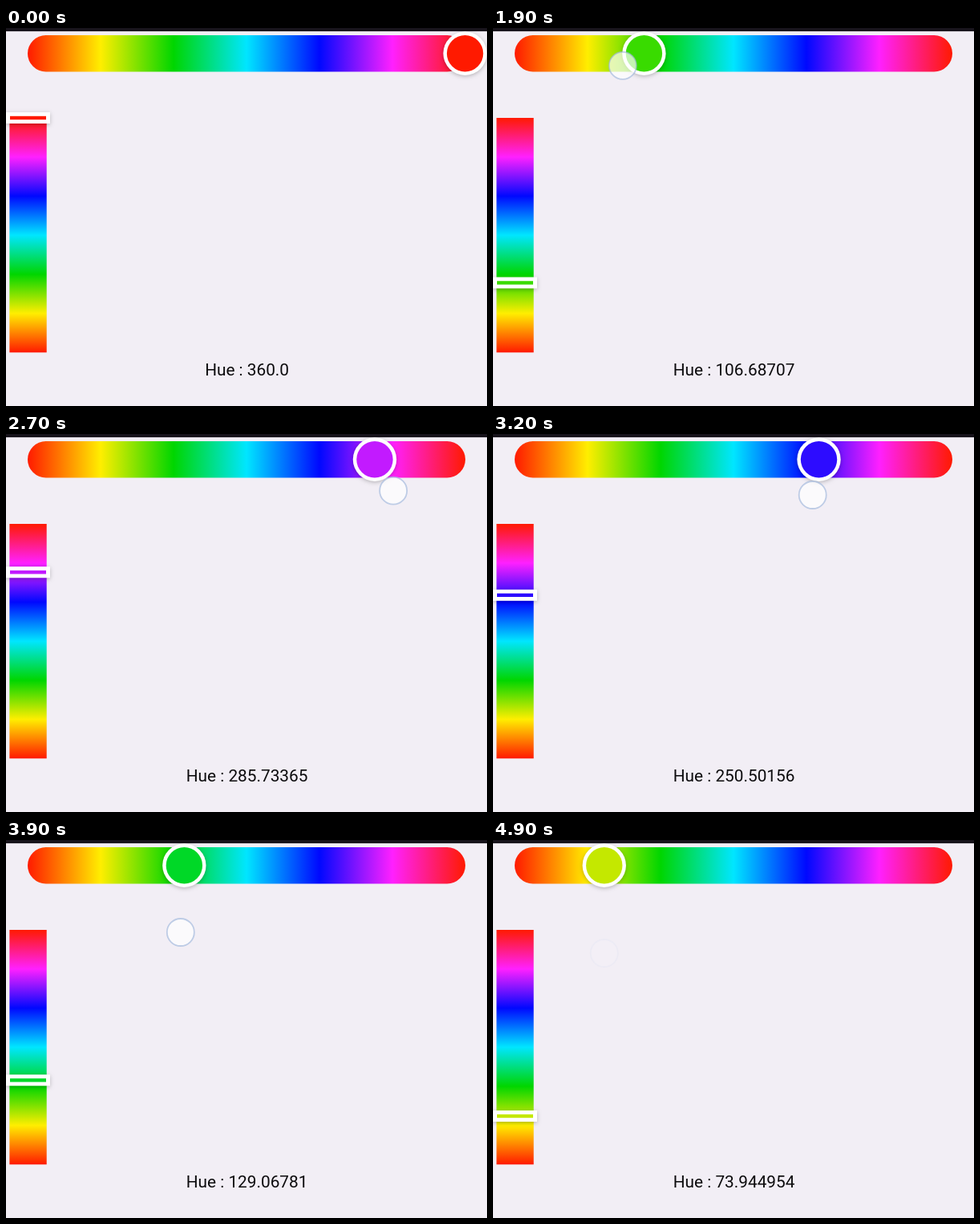
These frames come from a looping animation (600x471 px, 5000 ms). An HTML page with a canvas:

```html
<!DOCTYPE html>
<html lang="en">
<head>
<meta charset="utf-8">
<title>Hue sliders</title>
<style>
  html, body { margin: 0; width: 100%; height: 100%; overflow: hidden; background: #f2eef5; }
  canvas { position: absolute; left: 0; top: 0; display: block; }
  #label {
    position: absolute; left: 0.6px; top: 414px; width: 600px;
    font: 20.8px/24px Roboto, Arial, sans-serif;
    color: #0c0b0d; text-align: center; white-space: pre;
  }
</style>
</head>
<body>
<canvas id="stage" width="600" height="471"></canvas>
<div id="label"></div>
<script>
const ctx = document.getElementById('stage').getContext('2d');
const label = document.getElementById('label');

const LOOP = 5000, STEP = 100, TOUCH_START = 1500, LAG = 25;
const STOPS = ['#ff1a00', '#ffee00', '#00d600', '#00e6ff', '#0008ff', '#ff20ff', '#ff1a00'];

// Turning points of the drag: time, hue, finger height
const POSES = [
  [1500, 356.03772, 25], [2150, 0, 62], [2300, 14.956584, 67], [2850, 340, 72],
  [3200, 250.50156, 76], [3900, 129.06781, 115], [4300, 92.14279, 134], [4800, 73.944954, 141]
];

// Monotone cubic through one column of the poses, easing in and out at the ends
function curve(col) {
  const n = POSES.length - 1;
  const slope = i => (POSES[i + 1][col] - POSES[i][col]) / (POSES[i + 1][0] - POSES[i][0]);
  const tangent = i => {
    if (i === 0) return slope(0) / 3;
    if (i === n) return 0;
    const a = slope(i - 1), b = slope(i);
    return a * b <= 0 ? 0 : 2 * a * b / (a + b);
  };
  return t => {
    if (t >= POSES[n][0]) return POSES[n][col];
    let i = 0;
    while (t >= POSES[i + 1][0]) i++;
    const h = POSES[i + 1][0] - POSES[i][0], u = (t - POSES[i][0]) / h, w = 1 - u;
    return POSES[i][col] * (1 + 2 * u) * w * w + POSES[i + 1][col] * u * u * (3 - 2 * u)
      + h * u * w * (tangent(i) * w - tangent(i + 1) * u);
  };
}

const dragHue = curve(1);
const touchY = curve(2);
const hueX = hue => 26.6 + hue / 360 * 546;
const hueY = hue => 404 - hue / 360 * 292;

function rainbow(x0, y0, x1, y1) {
  const g = ctx.createLinearGradient(x0, y0, x1, y1);
  STOPS.forEach((c, i) => g.addColorStop(i / 6, c));
  return g;
}

function hueColor(hue) {
  const at = hue / 60, i = Math.min(5, Math.floor(at));
  const part = (c, k) => parseInt(c.slice(1 + 2 * k, 3 + 2 * k), 16);
  const mix = [0, 1, 2].map(k =>
    Math.round(part(STOPS[i], k) + (part(STOPS[i + 1], k) - part(STOPS[i], k)) * (at - i)));
  return `rgb(${mix})`;
}

const across = rainbow(27, 0, 573, 0);
const upward = rainbow(0, 404.3, 0, 112);

function circle(x, y, r, fill) {
  ctx.beginPath();
  ctx.arc(x, y, r, 0, Math.PI * 2);
  ctx.fillStyle = fill;
  ctx.fill();
}

function rect(x, y, w, h, fill) {
  ctx.fillStyle = fill;
  ctx.fillRect(x, y, w, h);
}

function withShadow(paint) {
  ctx.save();
  ctx.shadowColor = 'rgba(0,0,0,0.24)';
  ctx.shadowBlur = 5;
  ctx.shadowOffsetY = 1.5;
  paint();
  ctx.restore();
}

function drawTracks() {
  ctx.beginPath();
  ctx.roundRect(27, 9, 546, 45.5, 22.75);
  ctx.fillStyle = across;
  ctx.fill();
  rect(4.4, 112, 46.3, 292.3, upward);
}

function drawThumbs(hue) {
  const x = hueX(hue), y = hueY(hue), color = hueColor(hue);
  withShadow(() => circle(x, 31.7, 27.2, '#fff'));
  circle(x, 31.7, 22.7, color);
  withShadow(() => rect(0, y - 7, 55, 14, '#fff'));
  rect(5, y - 2.2, 45, 4.4, color);
}

function drawTouch(t) {
  const press = Math.min(1, 0.85 + (t - TOUCH_START) / 600);
  ctx.globalAlpha = Math.min(press, (4925 - t) / 210);
  // The thumb trails the finger by a short lag
  circle(hueX(dragHue(t + LAG)), touchY(t), 16 + press, 'rgba(255,255,255,0.7)');
  ctx.lineWidth = 1.8;
  ctx.strokeStyle = 'rgba(160,183,220,0.65)';
  ctx.stroke();
  ctx.globalAlpha = 1;
}

function hueText(hue) {
  const s = String(Number(hue.toPrecision(8)));
  return 'Hue : ' + (s.includes('.') ? s : s + '.0');
}

function draw(t) {
  const touching = t >= TOUCH_START;
  const hue = touching ? dragHue(t) : 360;
  rect(0, 0, 600, 471, '#f2eef5');
  rect(0, 4, 600, 1, '#d5d1d8');
  rect(0, 0, 600, 4, '#17131b');
  drawTracks();
  drawThumbs(hue);
  if (touching) drawTouch(t);
  label.textContent = hueText(hue);
}

function tick() {
  draw(Math.floor(performance.now() % LOOP / STEP) * STEP);
  requestAnimationFrame(tick);
}
tick();
</script>
</body>
</html>
```
